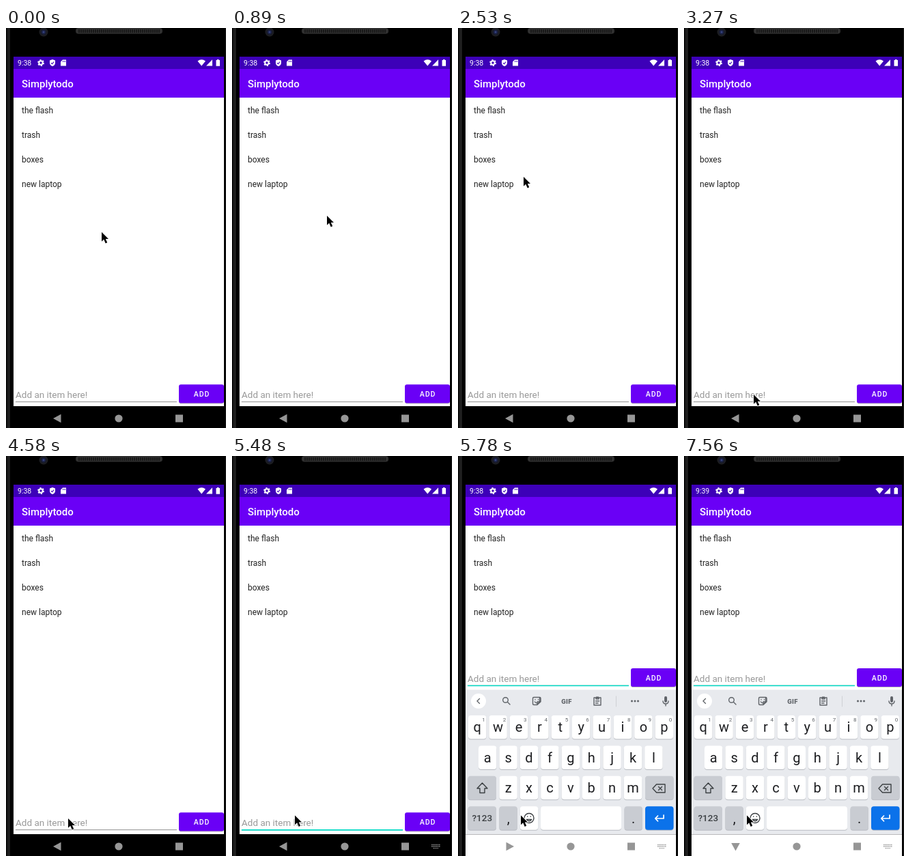
Recreate the animation shown at these times as an HTML page. Size 322 by 586 pixels, loop 8000 ms.

```html
<!DOCTYPE html>
<html lang="en">
<head>
<meta charset="utf-8">
<title>Todo list</title>
<style>
  html, body { margin: 0; height: 100%; overflow: hidden; background: #000; }
  svg { display: block; width: 100vw; height: 100vh; font-family: Roboto, sans-serif; }
  .item { font-size: 12px; fill: #222; }
  .letter { font-size: 20px; fill: #1c1d20; text-anchor: middle; }
  .digit { font-size: 8px; fill: #5f6368; text-anchor: middle; }
  .line { fill: none; stroke: #5f6368; stroke-width: 1.4; stroke-linecap: round; stroke-linejoin: round; }
  .solid { fill: #5f6368; }
</style>
</head>
<body>
<svg viewBox="0 0 322 586">
  <defs>
    <clipPath id="screen"><path d="M11 42H319V586H11z"/></clipPath>
    <radialGradient id="lens">
      <stop offset="0" stop-color="#4a5a9c"/><stop offset=".4" stop-color="#1c2450"/><stop offset="1" stop-color="#16171c"/>
    </radialGradient>
  </defs>

  <!-- phone body -->
  <path d="M0 0H322V586H0z"/>
  <path d="M0 0H2V586H0z" fill="#0c0c0c"/>
  <path d="M2 0H6V586H2z" fill="#1f1f1f"/>
  <path d="M321 0H322V586H321z" fill="#1a1a1a"/>
  <circle cx="55" cy="6" r="6.5" fill="#1d1e22"/>
  <circle cx="55" cy="6" r="4.5" fill="url(#lens)"/>
  <rect x="102" y="0" width="127" height="8.5" rx="4" fill="#303030"/>
  <path d="M106 4.5H225" stroke="#191919" stroke-width="5" stroke-dasharray="2 1"/>

  <!-- app -->
  <path d="M11 42H319V554H11z" fill="#fff"/>
  <path d="M11 42H319V60H11z" fill="#3d00b8"/>
  <path d="M11 60H319V102H11z" fill="#6a00f6"/>
  <g fill="#fff">
    <text id="clock" x="17" y="55" font-size="10.5"></text>
    <g fill="none" stroke="#fff">
      <circle cx="51" cy="51" r="2.7" stroke-width="2"/>
      <circle cx="51" cy="51" r="4.1" stroke-width="1.7" stroke-dasharray="2.15"/>
    </g>
    <path d="M68 46L72 47.6V51Q72 54.6 68 56Q64 54.6 64 51V47.6z"/>
    <path d="M66 51.2L67.5 52.7 70.2 49.5" fill="none" stroke="#3d00b8" stroke-width="1.1"/>
    <path d="M83 46.5H88V55.5H80V49.5z"/>
    <path d="M83.2 48V50M85 48V50M86.7 48V50" stroke="#3d00b8" stroke-width=".8"/>
    <path d="M280.5 48.6Q286.2 43.8 292 48.6L286.2 55.6zM302 46.3V55.5H293z"/>
    <path d="M307.5 47H309V46H311.5V47H313V55.8H307.5z"/>
    <text x="23" y="87" font-size="15" font-weight="500">Simplytodo</text>
  </g>
  <g id="items"></g>

  <g id="field">
    <text x="14" y="542" font-size="13.5" fill="#999">Add an item here!</text>
    <path d="M14 547.7H250" stroke="#8c8c8c"/>
    <path id="focus" stroke="#03dac5" stroke-width="1.6"/>
    <path id="caret" d="M14.3 528V546" stroke="#03dac5" stroke-width="1.5"/>
    <rect x="253" y="523.5" width="66" height="27" rx="3" opacity=".25"/>
    <rect x="253" y="522.3" width="66" height="27.2" rx="3" fill="#6a00f6"/>
    <text x="286.5" y="540" font-size="10.5" font-weight="500" letter-spacing=".94" text-anchor="middle" fill="#fff">ADD</text>
  </g>

  <g clip-path="url(#screen)">
    <g id="keyboard">
      <path d="M11 342.5H319V554.5H11z" fill="#e8eaee"/>
      <path d="M11 554.5H319V586H11z" fill="#fff"/>
      <circle cx="30" cy="359" r="11" fill="#fff"/>
      <g class="line">
        <path d="M31.5 355.5L28 359 31.5 362.5"/>
        <circle cx="69.5" cy="357.5" r="3.8"/><path d="M72.5 360.5L76 364"/>
        <path d="M111 353.5H119.5V360L115.5 364.5H111Q109.5 364.5 109.5 363V355Q109.5 353.5 111 353.5M119.5 353.5Q121 353.5 121 355V360L116 364.5V360H121M112.5 360Q113.5 362 115.5 361.5M113 356.7V357M117.5 356.7V357"/>
        <path d="M199 354H209V365H199zM202 354V356H206V354M201.5 359H206.5M201.5 362H205"/>
        <path d="M300 359Q300 363 304 363T308 359M304 363V366"/>
        <path d="M231.5 352V367" stroke="#cfd1d5" stroke-width="1"/>
      </g>
      <g class="solid">
        <path d="M202 352.5H206V355H202z"/>
        <rect x="302" y="352" width="4" height="9" rx="2"/>
        <circle cx="254.5" cy="359" r="1.5"/><circle cx="259" cy="359" r="1.5"/><circle cx="263.5" cy="359" r="1.5"/>
        <text x="159" y="362.5" font-size="9.5" font-weight="900" text-anchor="middle" letter-spacing=".4">GIF</text>
      </g>
      <g id="keys"></g>
      <g class="line" style="stroke:#3c4043">
        <path d="M35.5 479L43 487H39V493.5H32V487H28z"/>
        <path d="M290.5 481H303V493H290.5L285 487zM293.5 484.5L298.5 489.5M298.5 484.5L293.5 489.5"/>
        <circle cx="104" cy="530.5" r="7"/>
        <path d="M100.3 532.5Q104 537 107.7 532.5zM101.7 528V528.3M106.3 528V528.3"/>
        <path d="M301 526V531H289M292.5 527.2L288.7 531 292.5 534.8" stroke="#fff" stroke-width="1.7"/>
      </g>
      <text x="35.3" y="535" font-size="13.5" font-weight="500" fill="#3c4043" text-anchor="middle">?123</text>
    </g>
    <path id="navShade" d="M11 554H319V586H11z" opacity=".27"/>
  </g>

  <g id="nav" fill="#969696">
    <path id="back" d="M-6.5 0L5 -6.3V6.3z"/>
    <circle cx="165" cy="572" r="5.6"/>
    <path d="M248 566.5H259V577.5H248z"/>
    <path id="imeIcon" d="M292 569.5H304.5M292 572H304.5M294.5 574.7H302" stroke="#969696" stroke-width="1.3" stroke-dasharray="1.4 .8"/>
  </g>
  <path id="cursor" d="M0 0V13.8L3.2 10.8 5.7 16.4 8.2 15.3 5.8 9.9H10z" stroke="#fff" stroke-width="1.6" stroke-linejoin="round" paint-order="stroke"/>
</svg>

<script>
const LOOP = 8000;
const $ = id => document.getElementById(id);
const show = (id, on) => $(id).setAttribute('visibility', on ? 'visible' : 'hidden');
const move = (id, x, y, turn = 0) =>
  $(id).setAttribute('transform', `translate(${x} ${y}) rotate(${turn})`);
const latest = (steps, t) => steps.filter(s => s[0] <= t).pop();

$('items').innerHTML = ['the flash', 'trash', 'boxes', 'new laptop']
  .map((item, i) => `<text class="item" x="23" y="${124.5 + 36 * i}">${item}</text>`).join('');

// Keyboard geometry
const PITCH = 30.4, KEY_W = 26.4;
const rowTop = row => 380 + 44.4 * row;
const cap = (x, row, width = KEY_W, fill = '#fff') => {
  const box = `x="${x}" width="${width}" height="34.5" rx="4"`;
  return `<rect ${box} y="${rowTop(row) + 1}" fill="#b9bcc2"/><rect ${box} y="${rowTop(row)}" fill="${fill}"/>`;
};
const letter = (char, x, row) =>
  `<text class="letter" x="${x + KEY_W / 2}" y="${rowTop(row) + 24.3}">${char}</text>`;
const GREY = '#c9ccd2';

let keys = '';
[['qwertyuiop', 15], ['asdfghjkl', 30], ['zxcvbnm', 60.4]].forEach(([chars, left], row) => {
  [...chars].forEach((char, i) => {
    const x = left + PITCH * i;
    keys += cap(x, row) + letter(char, x, row);
    if (row === 0) keys += `<text class="digit" x="${x + 22.5}" y="389">${(i + 1) % 10}</text>`;
  });
});
keys += cap(14.5, 2, 41.5, GREY) + cap(274, 2, 41.5, GREY)
  + cap(14.5, 3, 41.5, GREY) + cap(60.4, 3, KEY_W, GREY) + letter(',', 60.4, 3)
  + cap(90.8, 3) + cap(121, 3, 118) + cap(243.5, 3, KEY_W, GREY) + letter('.', 243.5, 3)
  + cap(274, 3, 41.5, '#0b72ea');
$('keys').innerHTML = keys;

// [time, x, y]
const CURSOR = [
  [0, 140, 299], [300, 140, 290], [450, 139.5, 282], [890, 139, 275], [1040, 139, 270],
  [1640, 139, 268], [1780, 105, 230], [1930, 83, 205],
  [2230, 74, 188], [2380, 70, 180], [2530, 96, 218], [2680, 130, 300],
  [2820, 142, 390], [2970, 130, 468], [3120, 110, 522], [3270, 102, 537],
  [4140, 99, 535], [4290, 96, 533], [4440, 93, 532], [4580, 91, 531], [4730, 90, 530],
  [5030, 91, 528], [5180, 92, 526.5]
];
const BACK_TURN = [[0, 0], [5780, 180], [5920, 250], [6070, 270]];
const FOCUS = [[0, 92, 92], [5330, 14, 190], [5480, 14, 250]];
const CARET = [[0, false], [5920, true], [6520, false], [6960, true], [7560, false]];

function draw(t) {
  const open = t >= 5630, settled = t >= 5780;
  const [, x, y] = latest(CURSOR, t);
  const [, from, to] = latest(FOCUS, t);
  move('cursor', x, y);
  move('back', 75.5, 572, latest(BACK_TURN, t)[1]);
  move('field', 0, open ? -211.4 : 0);
  move('keyboard', 0, settled ? 0 : 57);
  $('focus').setAttribute('d', `M${from} 547.9H${to}`);
  $('clock').textContent = t < 6220 ? '9:38' : '9:39';
  show('keyboard', open);
  show('navShade', open && !settled);
  show('imeIcon', t >= 5480);
  show('caret', latest(CARET, t)[1]);
}

const start = performance.now();
function tick() {
  draw((performance.now() - start) % LOOP);
  requestAnimationFrame(tick);
}
tick();
</script>
</body>
</html>
```
